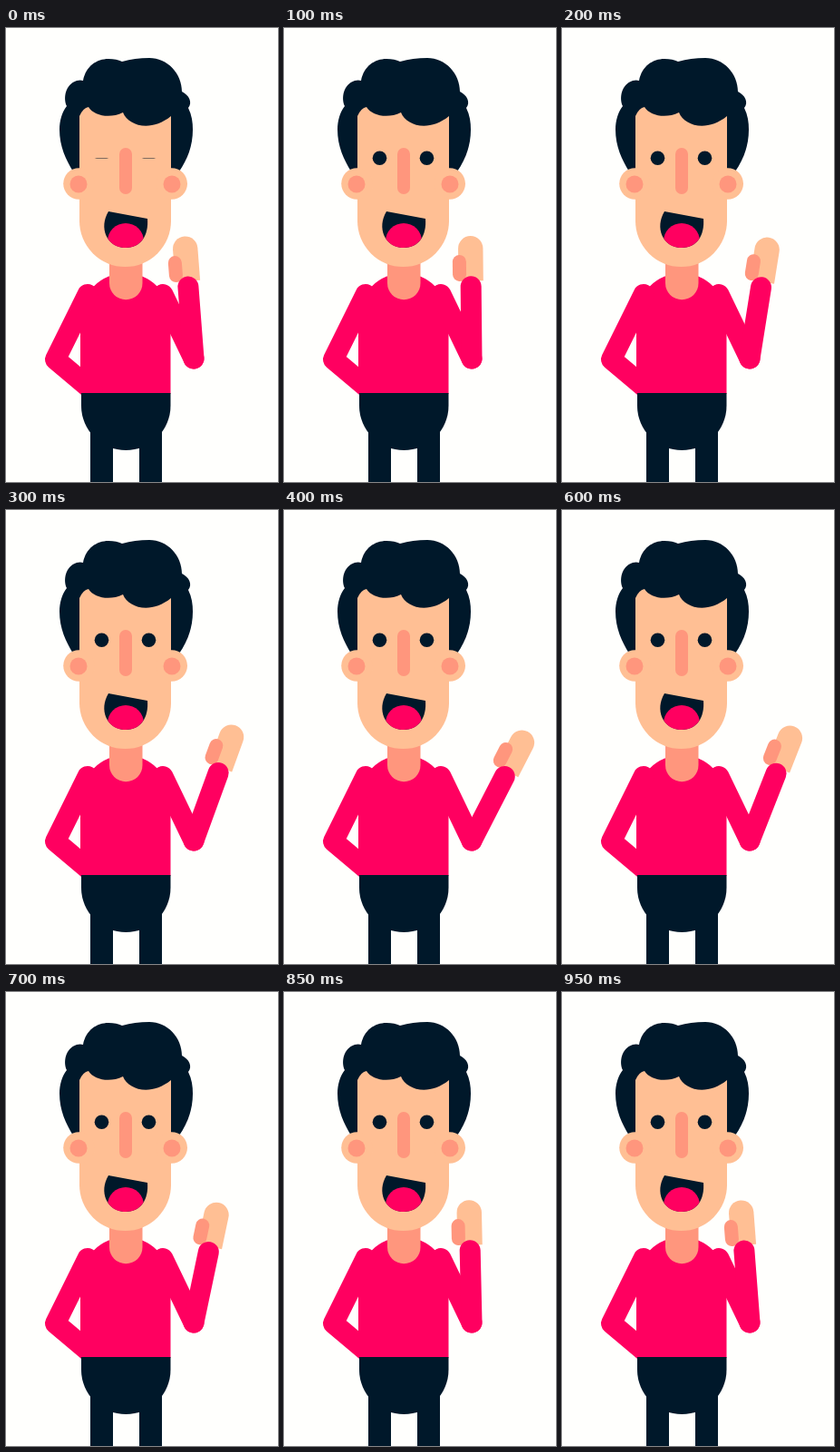
An HTML page for the animation above (1 s loop, 300 by 500 pixels).

```html
<!DOCTYPE html>
<html lang="en">
<head>
<meta charset="utf-8">
<title>Waving man</title>
<style>
  html, body { margin: 0; width: 100%; height: 100%; overflow: hidden; background: #fffffd; }
  svg { display: block; width: 100%; height: 100%; }
  .dark { fill: #00182a; }
  .skin { fill: #ffbf94; }
  .blush { fill: #ff967d; }
  .pink { fill: #ff0060; }
  .sleeve { fill: none; stroke: #ff0060; stroke-width: 23; stroke-linecap: round; stroke-linejoin: round; }
</style>
</head>
<body>
<svg viewBox="0 0 300 500">
  <defs>
    <path id="mouth" d="M113 202 L156 210 C157.500 228 149 242 132 242 C111 242 102 220 113 202Z"/>
    <clipPath id="inMouth"><use href="#mouth"/></clipPath>
  </defs>

  <!-- body -->
  <path class="pink" d="M82 403 V320 A49.750 50 0 0 1 181.500 320 V403Z"/>
  <path class="sleeve" d="M90 293.500 L54.500 365 L95 399"/>
  <path class="sleeve" d="M173 293.500 L207 364"/>
  <path class="dark" d="M83 402 H181.500 V416 A49.250 49 0 0 1 83 416Z"/>
  <path class="dark" d="M93 430 H118 V500 H93Z M147 430 H172 V500 H147Z"/>
  <path class="blush" d="M114 250 H150.500 V281 A18.250 18.250 0 0 1 114 281Z"/>

  <!-- head -->
  <path class="dark" d="M74 158 C66 145 59 130 59 112 C59 102 62 92 67 86 C63 78 65 62 78 58 Q82 57 85 58 C88 42 100 34 113 34 Q122 34 128 37 Q142 33 158 33 C178 33 194 50 194 70 C202 74 206 82 201 88 C205 96 206 104 206 112 C206 130 200 145 191 158Z"/>
  <path class="skin" d="M81 80 H182 V212.500 A50.500 50.500 0 0 1 81 212.500Z"/>
  <g class="skin"><circle cx="80.500" cy="171.500" r="17.300"/><circle cx="182.700" cy="171.500" r="17.300"/></g>
  <g class="blush"><circle cx="80" cy="172" r="9.500"/><circle cx="183" cy="172" r="9.500"/></g>
  <path class="dark" d="M81 97 Q85 88 91 87 C97 97 115 100 129 93 C135 108 160 115 182 97 V75 H81Z"/>
  <rect class="blush" x="125" y="132" width="14" height="51" rx="7"/>
  <g class="dark">
    <ellipse class="eye" cx="105.500" cy="143.300" rx="7.800" ry="7.800"/>
    <ellipse class="eye" cx="157.500" cy="143.300" rx="7.800" ry="7.800"/>
  </g>
  <use class="dark" href="#mouth"/>
  <circle class="pink" cx="132" cy="235" r="20" clip-path="url(#inMouth)"/>

  <!-- waving forearm, its elbow at the local zero point -->
  <g id="forearm">
    <path class="skin" d="M-13.700 -85.500 V-121.200 A13.700 13.700 0 0 1 13.700 -121.200 V-85.500Z"/>
    <rect class="blush" x="-20" y="-114.200" width="15" height="29" rx="7.500"/>
    <path class="sleeve" d="M0 0 V-79.300"/>
  </g>
</svg>
<script>
  const LOOP = 1000, STEP = 50, PEAK = 450, END = 950;
  const LOW = -4.4, HIGH = 28.2;
  const forearm = document.getElementById('forearm');
  const eyes = document.querySelectorAll('.eye');
  const ease = p => (1 - Math.cos(Math.PI * p)) / 2;

  function armAngle(t) {
    const lift = t < PEAK ? t / PEAK : Math.max(0, (END - t) / (END - PEAK));
    return LOW + (HIGH - LOW) * ease(lift);
  }

  function draw(ms) {
    const t = Math.floor((ms + 2) / STEP) * STEP % LOOP;
    forearm.setAttribute('transform', `translate(207 364) rotate(${armAngle(t)})`);
    const open = Math.min(1, t / 100);
    eyes.forEach(eye => eye.setAttribute('ry', 0.3 + 7.5 * open));
  }

  const start = performance.now();
  function tick() {
    draw(performance.now() - start);
    requestAnimationFrame(tick);
  }
  draw(0);
  requestAnimationFrame(tick);
</script>
</body>
</html>
```
